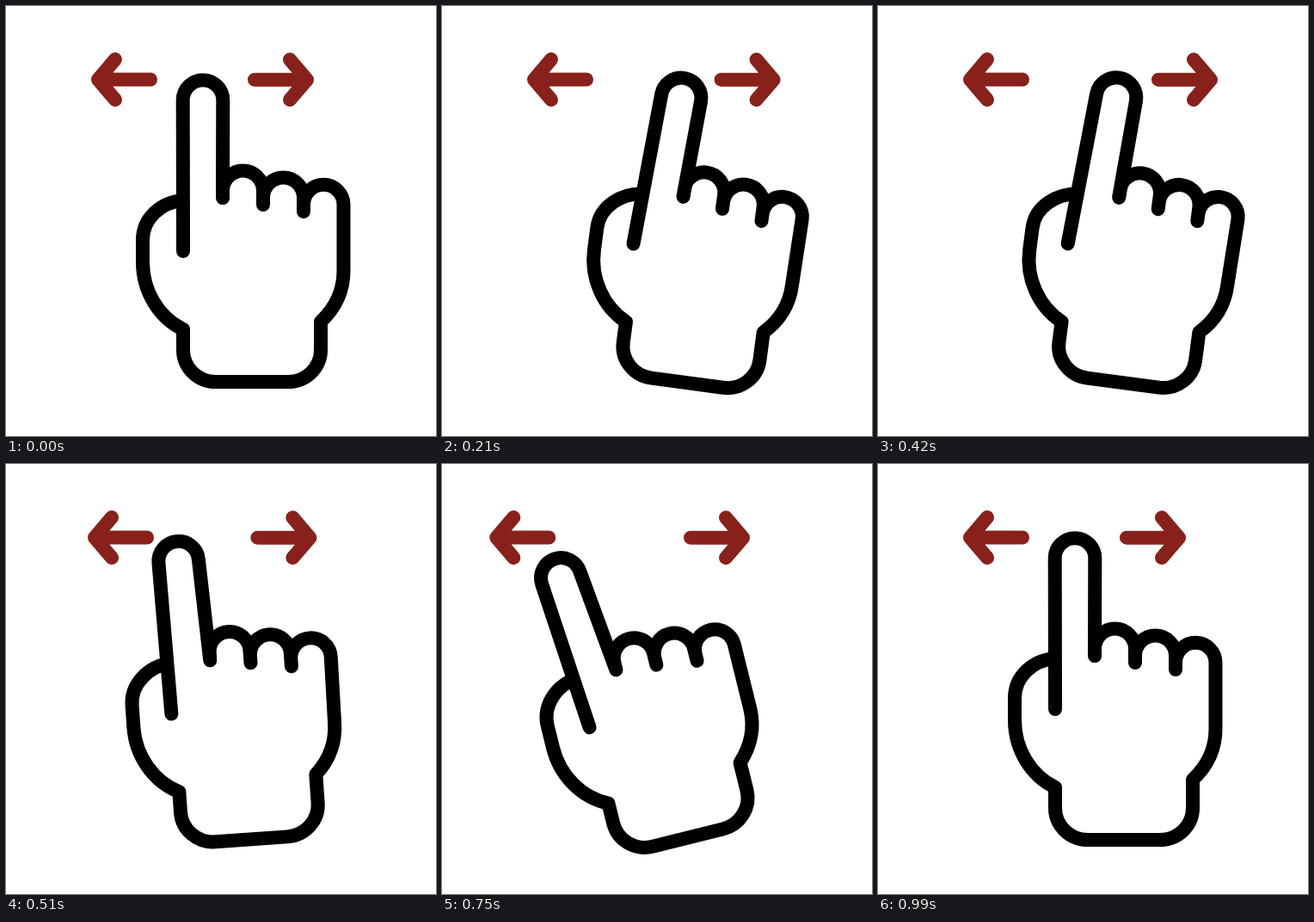
Animation, 500 px wide and 500 px high, one loop 1110 ms. Source, as an HTML page:

```html
<!DOCTYPE html>
<html>
<head>
<meta charset="utf-8">
<style>
  html, body { margin: 0; width: 100%; height: 100%; overflow: hidden; background: #fff; }
  svg { display: block; width: 100%; height: 100%; }
  path { stroke-width: 16; stroke-linecap: round; stroke-linejoin: round; fill: #fff; stroke: #000; }
  .arrow { fill: none; stroke: #88211b; }
</style>
</head>
<body>
<svg viewBox="0 0 500 500">
  <path class="arrow" id="left" d="M168 85.5H107M127 62L107 85.5L127 109"/>
  <path class="arrow" id="right" d="M289 85.7H350M330 62.3L350 85.7L330 109"/>
  <g id="hand">
    <path id="palm"/>
    <path id="finger"/>
  </g>
</svg>
<script>
const LOOP = 1110, STEP = 30;
const $ = id => document.getElementById(id);

const smooth = x => {
  x = Math.min(1, Math.max(0, x));
  return x * x * (3 - 2 * x);
};

// Rises from 0 to 1 between start and peak, then falls back to 0 at end.
const pulse = (t, start, peak, end) =>
  t < peak ? smooth((t - start) / (peak - start)) : smooth((end - t) / (end - peak));

// sag lowers the knuckles, shift bows the sides of the palm.
function palmPath(sag, shift) {
  const y1 = 215 + sag, y2 = 223 + sag / 2, y3 = 231 + sag / 5;
  const thumb = 159 + shift, side = 392.5 + shift;
  const wristL = 206 + shift / 2, wristR = 366 + shift / 2;
  return `M206 226C180 228 ${thumb} 247 ${thumb} 272V298
    C${thumb} 331 ${wristL - 29} 362 ${wristL} 376V400
    a38 37 0 0 0 38 37H${wristR - 38}a38 37 0 0 0 38 -37V367
    C${wristR + 16} 352 ${side} 332 ${side} 308
    L392.5 ${y3}A23.25 23.25 0 0 0 346 ${y3}v8
    V${y2}A23.5 23.5 0 0 0 299 ${y2}v8
    V${y1}A23.5 23.5 0 0 0 252 ${y1}v8`;
}

// The finger bends further than the hand turns.
function fingerPath(base, tip, lift, sag) {
  const r = 23.3, x = 229 + tip, y = 109.5 - lift;
  const bend = Math.atan((tip - base) / 175.5);
  const dx = r * Math.cos(bend), dy = r * Math.sin(bend);
  return `M${206 + base} 285L${x - dx} ${y - dy}
    A${r} ${r} 0 0 1 ${x + dx} ${y + dy}L252 ${223 + sag}`;
}

function draw(t) {
  const toRight = pulse(t, 60, 330, 660);
  const toLeft = pulse(t, 330, 660, 990);
  const sag = 5.2 * toLeft;

  $('hand').setAttribute('transform', `rotate(${13 * toRight - 17 * toLeft} 276 437)`);
  $('palm').setAttribute('d', palmPath(sag, -2.5 * toRight));
  $('finger').setAttribute('d',
    fingerPath(-7.2 * toRight, 9.5 * toRight - 16.6 * toLeft, 1.5 * toLeft, sag));

  const slide = (id, x) => $(id).setAttribute('transform', `translate(${x} 0)`);
  slide('right', 61 * pulse(t, 60, 330, 540));
  slide('left', -53.5 * pulse(t, 480, 660, 990));
}

function tick() {
  draw(Math.floor(performance.now() % LOOP / STEP) * STEP);
  requestAnimationFrame(tick);
}
tick();
</script>
</body>
</html>
```
